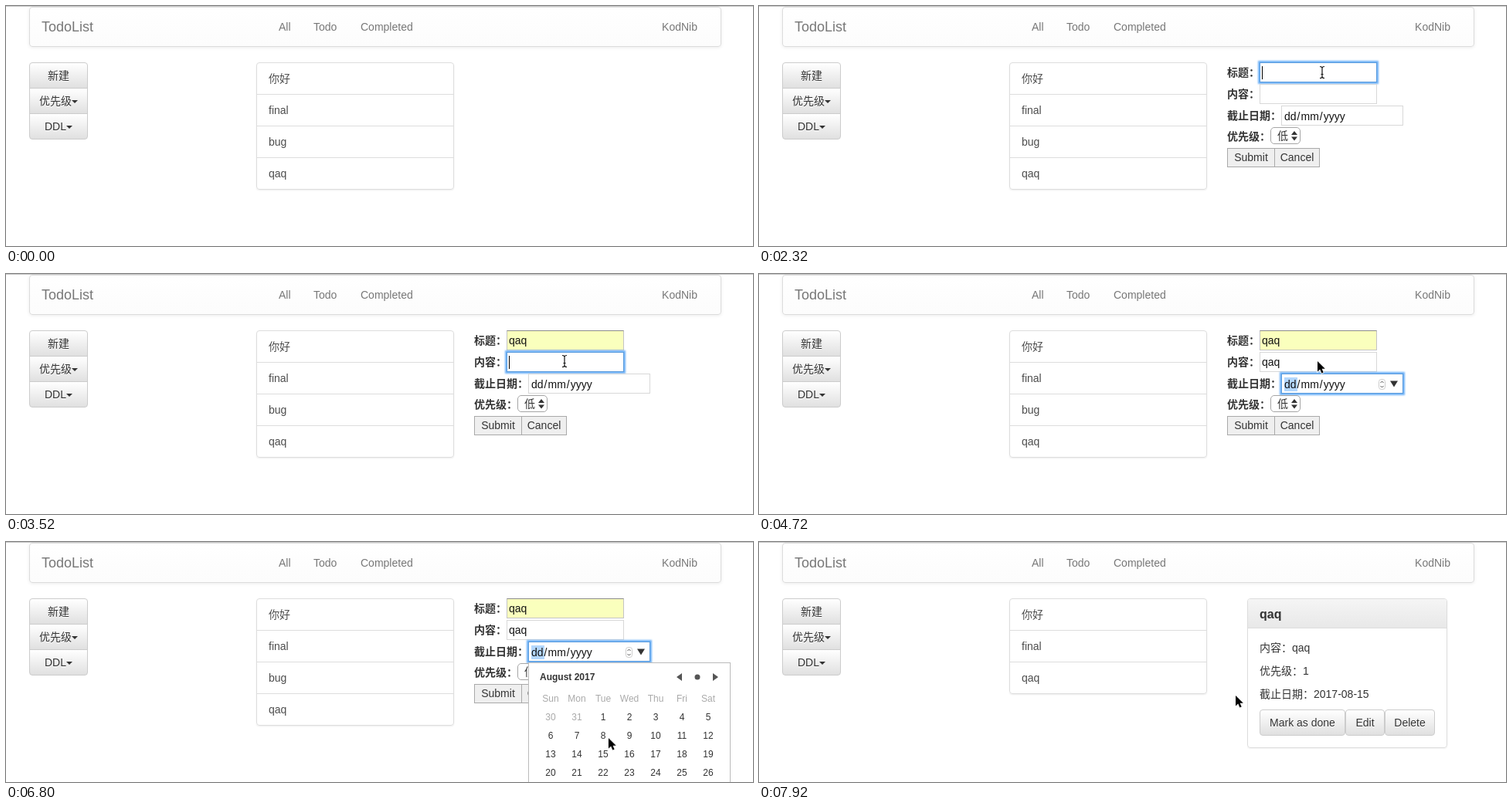
Animation of 967x311 px, one loop 8000 ms. Source, as an HTML page:

```html
<!DOCTYPE html>
<html lang="zh-CN">
<head>
<meta charset="utf-8">
<title>TodoList</title>
<style>
* { box-sizing: border-box; }
html, body { margin: 0; width: 100%; height: 100%; overflow: hidden; background: #fff; }
body { font: 14px/20px "Liberation Sans", "Noto Sans CJK SC", "Noto Sans CJK", sans-serif; color: #333; }
#stage { position: relative; width: 967px; height: 311px; overflow: hidden; border-top: 1px solid #c9c9c9; }
#page { position: absolute; inset: -1px 0 0; }
#page, #page * { white-space: nowrap; }
.abs, .btn, .field, nav, nav span, ul, .plain { position: absolute; }

/* one percent of the loop is 80 ms */
.t { animation: 8s step-end -5ms infinite; }

nav { left: 30px; top: 1px; width: 896px; height: 52px; border: 1px solid #dcdcdc; border-radius: 4px;
  background: linear-gradient(#fff, #fcfcfc); box-shadow: 0 1px 4px rgba(0,0,0,.08); color: #777; }
nav span { top: 15px; }
nav .brand { left: 15px; font-size: 18px; }

.btn { height: 34px; border: 1px solid #ccc; border-radius: 4px; text-align: center; line-height: 32px;
  background: linear-gradient(#fff, #e0e0e0); text-shadow: 0 1px 0 #fff; }
.side { left: 30px; width: 76px; border-radius: 0; }
.caret { display: inline-block; border: 4px solid transparent; border-top-color: #333; border-bottom: 0; vertical-align: middle; }

ul { left: 324px; top: 73px; width: 256px; margin: 0; padding: 0; list-style: none; overflow: hidden;
  border: 1px solid #ddd; border-radius: 4px; box-shadow: 0 1px 2px rgba(0,0,0,.075); color: #4c4c4c; }
li { height: 41px; padding: 10px 15px; border-top: 1px solid #ddd; overflow: hidden; }
li:first-child { height: 40px; border-top: 0; }

.label { position: absolute; left: 606px; font-weight: bold; }
.field { left: 648px; width: 152px; height: 26px; border: 1px solid #d8d8d8; color: #111; }
.typed { position: absolute; left: 2px; top: 4px; height: 17px; line-height: 17px; overflow: hidden;
  box-sizing: content-box; border-right: 1px solid transparent; width: 0; }
.date span { position: absolute; left: 2px; top: 3px; }
.date i { font-style: normal; padding: 0 1px; }
.date .hl { left: 3px; top: 4px; width: 17px; height: 18px; background: #b3d7fd; }
.date svg { position: absolute; left: 0; top: 0; }
.plain { top: 184px; height: 25px; border: 1px solid #a9a9a9; background: #efefef; text-align: center; line-height: 23px; }
.select { left: 662px; top: 157px; width: 39px; height: 22px; border: 1px solid #a5a5a5; border-radius: 5px; padding-left: 8px; line-height: 21px; }

.panel { left: 632px; top: 73px; width: 259px; height: 194px; border: 1px solid #ddd; border-radius: 4px; box-shadow: 0 1px 2px rgba(0,0,0,.06); }
.panel h3 { margin: 0; height: 38px; padding: 10px 15px; font-size: 16px; line-height: 19px; border-bottom: 1px solid #ddd;
  background: linear-gradient(#f5f5f5, #e8e8e8); border-radius: 3px 3px 0 0; }
.panel p { position: absolute; left: 15px; margin: 0; }
.panel .btn { top: 143px; }

.cal { left: 676px; top: 156px; width: 262px; height: 200px; background: #fff; border: 1px solid #bbb; font-size: 12px; }
.cal b { position: absolute; left: 14px; top: 8px; }
.cal svg { position: absolute; right: 12px; top: 10px; }
.grid { position: absolute; left: 11px; top: 34px; display: grid; grid-template-columns: repeat(7, 34px); grid-auto-rows: 24px;
  line-height: 24px; text-align: center; }
.grid .off { color: #aaa; }

#cur { left: 0; top: 0; width: 1px; height: 1px; overflow: visible; animation: path 8s ease-in-out -5ms infinite; }

@keyframes new {
  0%, 28% { background: linear-gradient(#fff, #e0e0e0); border-color: #ccc; box-shadow: none; }
  12% { background: #e0e0e0; border-color: #adadad; box-shadow: none; }
  17% { background: #d4d4d4; border-color: #5b9bdc; box-shadow: 0 0 2px 2px #6db1f7, inset 0 3px 5px rgba(0,0,0,.125); }
  18% { background: #e0e0e0; border-color: #5b9bdc; box-shadow: 0 0 2px 2px #6db1f7; }
}
@keyframes title {
  0% { border-color: #d8d8d8; background: #fff; box-shadow: none; }
  28% { border-color: #5b9bdc; background: #fff; box-shadow: 0 0 2px 2px #6db1f7; }
  38% { border-color: #5b9bdc; background: #faffbd; box-shadow: 0 0 2px 2px #6db1f7; }
  43% { border-color: #8c8c8c #c4c4c4 #c4c4c4; background: #faffbd; box-shadow: none; }
}
@keyframes content {
  0%, 55% { border-color: #d8d8d8; box-shadow: none; }
  43% { border-color: #5b9bdc; box-shadow: 0 0 2px 2px #6db1f7; }
}
@keyframes date {
  0% { border-color: #d8d8d8; box-shadow: none; }
  55% { border-color: #5b9bdc; box-shadow: 0 0 2px 2px #6db1f7; }
}
@keyframes type1 {
  0% { width: 0; border-color: transparent; }
  28% { width: 0; border-color: #000; }
  32% { width: 7.8px; border-color: #000; }
  34% { width: 15.6px; border-color: #000; }
  36% { width: 23.4px; border-color: #000; }
  43% { width: 23.4px; border-color: transparent; }
}
@keyframes type2 {
  0% { width: 0; border-color: transparent; }
  43% { width: 0; border-color: #000; }
  46% { width: 7.8px; border-color: #000; }
  48% { width: 15.6px; border-color: #000; }
  50% { width: 23.4px; border-color: #000; }
  55% { width: 23.4px; border-color: transparent; }
}
@keyframes form { 0%, 97% { opacity: 0; } 18% { opacity: 1; } }
@keyframes panel { 0% { opacity: 0; } 97% { opacity: 1; } }
@keyframes tools { 0% { opacity: 0; } 55% { opacity: 1; } }
@keyframes empty { 0% { opacity: 1; } 89% { opacity: 0; } }
@keyframes filled { 0% { opacity: 0; } 89% { opacity: 1; } }
@keyframes over { 0%, 82% { opacity: 0; } 75% { opacity: 1; } }
@keyframes cal { 0%, 89% { opacity: 0; } 79% { opacity: 1; } }
@keyframes day { 0% { background: transparent; } 86% { background: #d5e3f8; } }
@keyframes gone { 0% { height: 41px; padding: 10px 15px; border-width: 1px; } 97% { height: 0; padding: 0 15px; border-width: 0; } }
@keyframes arrow { 0%, 19%, 59% { opacity: 1; } 12%, 27% { opacity: 0; } }
@keyframes hand { 0%, 19% { opacity: 0; } 12% { opacity: 1; } }
@keyframes beam { 0%, 32%, 46% { opacity: 0; } 27%, 41% { opacity: 1; } }
@keyframes click {
  0%, 18%, 29%, 44%, 79%, 89%, 96% { opacity: 0; }
  17%, 28%, 43%, 78%, 88%, 95% { opacity: 1; }
}
@keyframes path {
  0% { transform: translate(432px, 320px); }
  11% { transform: translate(110px, 108px); animation-timing-function: ease-out; }
  13%, 18% { transform: translate(77px, 96px); }
  27%, 40% { transform: translate(729px, 86px); }
  43%, 59% { transform: translate(723px, 113px); }
  64% { transform: translate(697px, 173px); }
  67%, 70% { transform: translate(692px, 171px); }
  76%, 80% { transform: translate(817px, 147px); }
  87%, 89% { transform: translate(773px, 274px); }
  93% { transform: translate(649px, 218px); }
  95%, 96% { transform: translate(641px, 201px); }
  99%, 100% { transform: translate(617px, 199px); }
}
</style>
</head>
<body>
<div id="stage"><div id="page">
  <nav>
    <span class="brand">TodoList</span>
    <span style="left:322px">All</span>
    <span style="left:367px">Todo</span>
    <span style="left:428px">Completed</span>
    <span style="right:30px">KodNib</span>
  </nav>

  <div class="btn side t" style="top:73px;z-index:1;border-radius:4px 4px 0 0;animation-name:new">新建</div>
  <div class="btn side" style="top:106px">优先级<span class="caret"></span></div>
  <div class="btn side" style="top:139px;border-radius:0 0 4px 4px">DDL<span class="caret"></span></div>

  <ul>
    <li>你好</li>
    <li>final</li>
    <li class="t" style="animation-name:gone">bug</li>
    <li>qaq</li>
  </ul>

  <div class="abs t" style="left:0;top:0;animation-name:form">
    <span class="label" style="top:76px">标题：</span>
    <div class="field t" style="top:73px;animation-name:title"><span class="typed t" style="animation-name:type1">qaq</span></div>
    <span class="label" style="top:104px">内容：</span>
    <div class="field t" style="top:101px;animation-name:content"><span class="typed t" style="animation-name:type2">qaq</span></div>
    <span class="label" style="top:132px">截止日期：</span>
    <div class="field date t" style="left:676px;top:129px;width:158px;animation-name:date">
      <span class="hl t" style="animation-name:tools"></span>
      <span class="t" style="animation-name:empty"><i>dd</i>/<i>mm</i>/<i>yyyy</i></span>
      <span class="t" style="animation-name:filled"><i>15</i>/<i>08</i>/<i>2017</i></span>
      <svg class="t" style="animation-name:tools" width="156" height="24">
        <rect class="t" style="animation-name:over" x="137" y="3" width="17" height="19" fill="#e4e4e4"/>
        <path d="M140 8.500h10l-5 8z" fill="#333"/>
        <rect x="125.500" y="6.500" width="8" height="13" rx="3" fill="#fff" stroke="#ccc"/>
        <path d="M127.500 11l2-2 2 2M127.500 15l2 2 2-2" fill="none" stroke="#555"/>
        <g class="t" style="animation-name:filled">
          <circle cx="114" cy="12" r="7" fill="#bdbdbd"/>
          <path d="M111 9l6 6m0-6l-6 6" stroke="#fff" stroke-width="1.600"/>
        </g>
      </svg>
    </div>
    <span class="label" style="top:159px">优先级：</span>
    <div class="abs select">低
      <svg class="abs" style="left:25px;top:3px" width="10" height="14"><path d="M1 6l4-5 4 5zM1 8.500l4 5 4-5z" fill="#333"/></svg>
    </div>
    <div class="plain" style="left:606px;width:62px">Submit</div>
    <div class="plain" style="left:667px;width:59px">Cancel</div>
  </div>

  <div class="abs panel t" style="animation-name:panel">
    <h3>qaq</h3>
    <p style="top:53px">内容：qaq</p>
    <p style="top:83px">优先级：1</p>
    <p style="top:113px">截止日期：2017-08-15</p>
    <div class="btn" style="left:15px;width:111px">Mark as done</div>
    <div class="btn" style="left:126px;width:51px">Edit</div>
    <div class="btn" style="left:177px;width:65px">Delete</div>
  </div>

  <div class="abs cal t" style="animation-name:cal">
    <b>August 2017</b>
    <svg width="60" height="16"><path d="M10 3v10l-7-5zM50 3v10l7-5z" fill="#555"/><circle cx="30" cy="8" r="3.500" fill="#555"/></svg>
    <div class="grid"></div>
  </div>

  <svg class="abs" id="cur" style="z-index:2">
    <circle class="t" style="animation-name:click" r="16.500" fill="#fff" fill-opacity=".25" stroke="#222" stroke-width="1.200"/>
    <path class="t" style="animation-name:arrow" d="M0 0V13.500L3.200 10.600 5.400 15.600 7.700 14.600 5.600 9.800H9.800Z" stroke="#fff" paint-order="stroke" stroke-width="1.600"/>
    <path class="t" style="animation-name:hand" d="M-3 2V-6Q-2-8-.5-6V-1Q1-2.500 2-.5 3.500-1.500 4.200.3 6-.2 6 2V5Q5 6.500 4.500 8.500H-2Q-3 6.500-6.500 2.500-7 .5-5 .5Z" fill="#fff" stroke="#111"/>
    <path class="t" style="animation-name:beam" d="M-3-7.500Q0-7.500 0-5.500 0-7.500 3-7.500M0-6V6M-3 7.500Q0 7.500 0 5.500 0 7.500 3 7.500M-1.500 2.500h3" fill="none" stroke="#111" stroke-width="1.200"/>
  </svg>
</div></div>
<script>
const grid = document.querySelector('.grid');
const addCell = (text, cls = '') => {
  const cell = document.createElement('span');
  cell.textContent = text;
  cell.className = cls;
  grid.append(cell);
  return cell;
};
['Sun', 'Mon', 'Tue', 'Wed', 'Thu', 'Fri', 'Sat'].forEach(name => addCell(name, 'off'));
for (let i = 0; i < 35; i++) {
  const day = new Date(2017, 6, 30 + i);
  const cell = addCell(day.getDate(), day.getMonth() === 7 ? '' : 'off');
  if (i === 16) {
    cell.className = 't';
    cell.style.animationName = 'day';
  }
}
</script>
</body>
</html>
```
